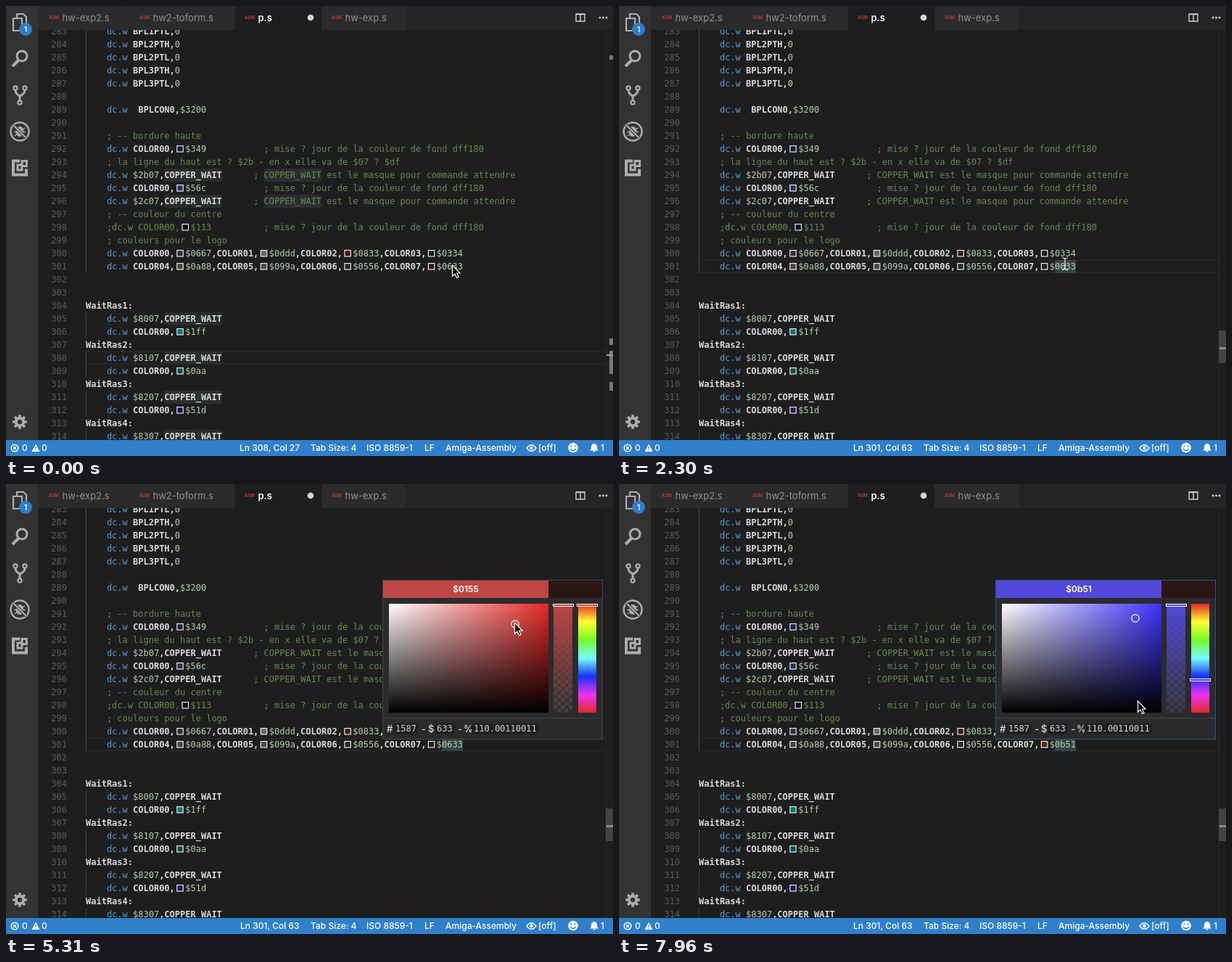
An HTML page with a canvas that plays this animation: 837x620 px, repeating every 8 s.

```html
<!DOCTYPE html>
<html lang="en">
<head>
<meta charset="utf-8">
<title>Assembly colour picker</title>
<style>
html, body { margin: 0; width: 100%; height: 100%; overflow: hidden; background: #1e1e1e; }
canvas { display: block; }
</style>
</head>
<body>
<canvas id="stage" width="837" height="620"></canvas>
<script>
const g = document.getElementById('stage').getContext('2d', { alpha: false });
const LOOP = 8000, CLICK = 660, OPEN = 2360, PRESS = 3490, RELEASE = 5450, HUE_PRESS = 6270, HUE_RELEASE = 7260;
const MONO = '12px "DejaVu Sans Mono", monospace';
const ui = (size, weight = 400) => `${weight} ${size}px Inter, sans-serif`;
const CW = 7.224, LEFT = 110, SWATCH = 14.4, FIRST = 283;
const WHITE = '#d8d8d8', GREEN = '#638b4d', NUMBER = '#b5cea8', KEYWORD = '#569cd6', ICON = '#adadad';

// "~" marks a colour swatch in front of a value
const wait = n => `    dc.w $${n},COPPER_WAIT`;
const fond = '; mise ? jour de la couleur de fond dff180';
const masque = wait('').length && '      ; COPPER_WAIT est le masque pour commande attendre';
const source = value => [
  ...['1PTL', '2PTH', '2PTL', '3PTH', '3PTL'].map(s => `    dc.w BPL${s},0`),
  '',
  '    dc.w  BPLCON0,$3200',
  '',
  '    ; -- bordure haute',
  '    dc.w COLOR00,~$349           ' + fond,
  '    ; la ligne du haut est ? $2b - en x elle va de $07 ? $df',
  wait('2b07') + masque,
  '    dc.w COLOR00,~$56c           ' + fond,
  wait('2c07') + masque,
  '    ; -- couleur du centre',
  '    ;dc.w COLOR00,~$113          ' + fond,
  '    ; couleurs pour le logo',
  '    dc.w COLOR00,~$0667,COLOR01,~$0ddd,COLOR02,~$0833,COLOR03,~$0334',
  '    dc.w COLOR04,~$0a88,COLOR05,~$099a,COLOR06,~$0556,COLOR07,~' + value,
  '', '',
  'WaitRas1:', wait('8007'), '    dc.w COLOR00,~$1ff',
  'WaitRas2:', wait('8107'), '    dc.w COLOR00,~$0aa',
  'WaitRas3:', wait('8207'), '    dc.w COLOR00,~$51d',
  'WaitRas4:', wait('8307')
];

const pointerPath = [
  [0, 615, 357], [1610, 615, 357], [1900, 617, 360], [2190, 615, 355], [2900, 615, 355],
  [3130, 681, 263], [PRESS, 681, 263], [4250, 696, 198], [4310, 696, 198], [4950, 701, 191],
  [5310, 701, 191], [RELEASE, 711, 183], [6040, 798, 251], [HUE_PRESS, 798, 251],
  [6500, 801, 262], [6740, 801, 264], [6850, 802, 270], [6970, 802, 273],
  [HUE_RELEASE, 802, 273], [7660, 724, 250], [7840, 724, 250], [7960, 715, 299], [LOOP, 715, 299]
];
const titles = [[0, '$0633'], [PRESS, '$0133'], [3900, '$0166'], [4600, '$0155'],
  [HUE_PRESS, '$0651'], [6740, '$0851'], [6900, '$0b51']];
const values = [[0, '$0633'], [RELEASE, '$0155'], [HUE_RELEASE, '$0b51']];
const hues = [[229, 42, 38], [255, 254, 50], [117, 250, 40], [117, 251, 253], [21, 50, 253], [234, 51, 247], [229, 42, 38]];

const lerp = (a, b, k) => a + (b - a) * k;
const rgb = (c, a = 1) => `rgba(${c.map(Math.round)},${a})`;
const at = (list, t) => list.filter(e => e[0] <= t).pop()[1];
const rowTop = n => 26 + (n - FIRST) * 18;

function pointer(t) {
  const i = Math.max(1, pointerPath.findIndex(p => p[0] > t));
  const a = pointerPath[i - 1], b = pointerPath[i];
  let k = (t - a[0]) / (b[0] - a[0]);
  k = k * k * (3 - 2 * k);
  return [lerp(a[1], b[1], k), lerp(a[2], b[2], k)];
}

function hueColor(k) {
  const i = Math.min(5, Math.floor(k * 6));
  return hues[i].map((c, n) => lerp(c, hues[i + 1][n], k * 6 - i));
}

function rect(x, y, w, h, color) {
  g.fillStyle = color;
  g.fillRect(x, y, w, h);
}
function frame(x, y, w, h, color) {
  g.lineWidth = 1;
  g.strokeStyle = color;
  g.strokeRect(x + .5, y + .5, w - 1, h - 1);
}
function text(s, x, y, color, font, align = 'left') {
  g.font = font;
  g.fillStyle = color;
  g.textAlign = align;
  g.fillText(s, x, y);
}
function line(d, color, width) {
  g.strokeStyle = color;
  g.lineWidth = width;
  g.stroke(new Path2D(d));
}
function fill(d, color) {
  g.fillStyle = color;
  g.fill(new Path2D(d));
}
function circle(x, y, r, color, width) {
  g.beginPath();
  g.arc(x, y, r, 0, 7);
  g.fillStyle = g.strokeStyle = color;
  g.lineWidth = width;
  width ? g.stroke() : g.fill();
}
function gradient(x, y, w, h, vertical, ...colors) {
  const fade = g.createLinearGradient(x, y, vertical ? x : x + w, vertical ? y + h : y);
  colors.forEach((c, i) => fade.addColorStop(i / (colors.length - 1), c));
  rect(x, y, w, h, fade);
}

function codeLine(s, y) {
  let x = LEFT;
  for (const token of s.match(/;.*|dc\.w|~?\$[\da-f]+|\b0\b|\w+:?|\s+|,/g) || []) {
    const color = token[0] === ';' ? GREEN : token === 'dc.w' ? KEYWORD : /^(~?\$|0$)/.test(token) ? NUMBER : WHITE;
    token.split('~').forEach((part, i) => {
      if (i) {
        const dim = [...part.match(/[\da-f]{3}\b/)[0]].map(d => parseInt(d, 16) * 8);
        rect(x + 2.4, y + 4, 9.6, 9.6, '#e8e8e8');
        rect(x + 3.6, y + 5.2, 7.2, 7.2, rgb(dim));
        x += SWATCH;
      }
      text(part, x, y + 13, color, (color === WHITE ? 'bold ' : '') + MONO);
      x += part.length * CW;
    });
  }
}

function editor(t) {
  const clicked = t >= CLICK, current = clicked ? 301 : 308, y = rowTop(current);
  rect(44, 33, 793, 565, '#1e1e1e');
  g.save();
  g.beginPath();
  g.rect(44, 33, 793, 565);
  g.clip();
  rect(LEFT, y, 717, 1, '#2c2c2c');
  rect(LEFT, y + 17, 717, 1, '#2c2c2c');
  if (t >= 1010) rect(601, 350, 29, 18, '#37434a');
  source(at(values, t)).forEach((s, i) => {
    const n = FIRST + i, top = rowTop(n);
    if (!clicked) for (const m of s.matchAll(/COPPER_WAIT/g)) rect(LEFT + m.index * CW, top, 11 * CW, 18, '#2b2e2f');
    if (n <= 301 || s[0] === ' ') rect(LEFT, top, 1, 18, n <= 301 || n === 308 || n === 309 ? '#4a4a4a' : '#3a3a3a');
    text(n, 84, top + 13, '#5a5a5a', MONO, 'right');
    codeLine(s, top);
  });
  const caret = clicked && t < PRESS && (t < 1190 || (t >= 1690 && t < 2190) || (t >= 2660 && t < 3130));
  if (caret) rect(615, 350, 2, 18, '#aeafad');
  rect(827, 33, 1, 565, '#2b2b2b');
  if (clicked) {
    rect(827, 447, 10, 45, '#434343');
    rect(828, 470, 9, t < 1010 ? 2 : 3, '#8c8c8c');
  } else {
    for (const [top, h] of [[68, 6], [458, 9], [475, 32], [518, 12]]) rect(832, top, 5, h, '#777');
    rect(828, 480, 9, 2, '#a0a0a0');
  }
  g.restore();
}

function tabs() {
  rect(44, 0, 793, 33, '#252526');
  rect(44, 0, 125, 33, '#2b2b2c');
  rect(170, 0, 145, 33, '#2b2b2c');
  rect(316, 0, 119, 33, '#1e1e1e');
  rect(436, 0, 115, 33, '#2b2b2c');
  [[59, 'hw-exp2.s'], [184, 'hw2-toform.s'], [329, 'p.s'], [449, 'hw-exp.s']].forEach(([x, name], i) => {
    text('ASM', x, 18, '#c0413d', ui(6, 600));
    text(name, x + 18.5, 21, i === 2 ? '#fff' : '#919191', ui(13, i === 2 ? 600 : 400));
  });
  circle(420, 16, 4.3, '#d4d4d4');
  line('M786 11.5h12v9.5h-12zM792 11v10M785.5 11h13', '#d0d0d0', 1.4);
  for (const x of [819, 823.5, 828]) circle(x, 16, 1.5, '#d0d0d0');
}

function activityBar() {
  rect(0, 0, 44, 598, '#333');
  line('M15 17v-6h9l4 4v13h-6M10 17h12v17h-12z', ICON, 2.2);
  circle(27, 32, 9, '#2f7dcb');
  text('1', 27, 36, '#fff', ui(10, 600), 'center');
  circle(22, 69, 7, ICON, 3);
  line('M17 75L9 83', ICON, 4);
  for (const [x, y] of [[13, 113], [26, 113], [19, 133]]) circle(x, y, 2.6, ICON, 2.2);
  line('M13 116q0 5 6 8q7-3 7-8M19 123v7', ICON, 3);
  circle(19, 173, 12.5, ICON, 2.5);
  fill('M19 166c7 0 7 14 0 14s-7-14 0-14', ICON);
  line('M12 168l14 11M12 179l14-11M11 173.5h16', ICON, 1.5);
  line('M10 164l18 18', '#333', 4);
  line('M10 164l18 18', ICON, 2.2);
  line('M19 213.5h-9v19h18v-8', ICON, 4);
  line('M22 213.5h6.5v7h-6.5zM16 219h6v7h-6z', ICON, 3);
  circle(19, 573, 5.2, ICON, 4);
  for (let i = 0; i < 8; i++) {
    const c = Math.cos(i * Math.PI / 4), s = Math.sin(i * Math.PI / 4);
    line(`M${19 + 6 * c} ${573 + 6 * s}L${19 + 9.8 * c} ${573 + 9.8 * s}`, ICON, 3.6);
  }
}

function statusBar(t) {
  rect(0, 598, 837, 22, '#307fcb');
  const label = (s, x) => text(s, x, 613, '#fff', ui(12, 500));
  circle(12, 609, 4.8, '#fff', 1.5);
  line('M10 607l4 4M14 607l-4 4', '#fff', 1.5);
  label('0', 22);
  fill('M41 603.5l5.5 10.5h-11z', '#fff');
  line('M41 607v3.5M41 611.5v1.2', '#307fcb', 1.3);
  label('0', 49);
  t < CLICK ? label('Ln 308, Col 27', 322) : label('Ln 301, Col 63', 323);
  label('Tab Size: 4', 420);
  label('ISO 8859-1', 497);
  label('LF', 577);
  label('Amiga-Assembly', 606);
  line('M718 609q6.5-8.5 13 0q-6.5 8.5-13 0z', '#fff', 1.4);
  circle(724.5, 609, 2.4, '#fff');
  label('[off]', 734);
  circle(782, 608.5, 6.8, '#fff');
  for (const x of [779.5, 784.5]) circle(x, 606.5, 1.1, '#307fcb');
  line('M778 610q4 5 8 0', '#307fcb', 1.3);
  fill('M805 612.5q2-1 2-5c0-6 8-6 8 0q0 4 2 5zM809 613h4q-2 3-4 0z', '#fff');
  label('1', 820);
}

function picker(t) {
  const [px, py] = pointer(Math.min(t, RELEASE));
  const [cx, cy] = t < PRESS ? [640, 287] : [px + 1, py + 2];
  const hueY = t < HUE_PRESS ? 167 : pointer(Math.min(t, HUE_RELEASE))[1] - 3;
  const base = hueColor((hueY - 167) / 150 + (t < HUE_PRESS ? 0 : .012));
  const sat = (cx - 528) / 220, val = 1 - (cy - 165) / 150;
  const color = base.map(c => val * lerp(255, c, sat));
  const old = '#2c1615';
  const focused = (t >= RELEASE && t < HUE_PRESS) || t >= HUE_RELEASE;

  rect(519, 132, 304, 220, '#2b2b2e');
  rect(520, 133, 302, 24, old);
  if (t >= PRESS) rect(520, 133, 228, 24, rgb(color));
  text(at(titles, t), 634, 149, '#fff', ui(12, 600), 'center');

  rect(528, 165, 220, 150, rgb(base));
  gradient(528, 165, 220, 150, false, '#fff', 'rgba(255,255,255,0)');
  gradient(528, 165, 220, 150, true, 'rgba(0,0,0,0)', '#000');
  circle(cx, cy, 5.2, '#fff', 1.2);

  rect(755, 165, 26, 150, '#2e2e30');
  for (let y = 0; y < 30; y++) for (let x = y % 2; x < 5; x += 2) rect(755 + x * 5.2, 165 + y * 5, 5.2, 5, '#3e3e40');
  gradient(755, 165, 26, 150, true, rgb(color), rgb(color, 0));
  gradient(789, 165, 25, 150, true, ...hues.map(c => rgb(c)));
  frame(754, 165, 29, 4, '#fff');
  frame(787, Math.round(hueY) - 2, 29, 4, '#fff');

  rect(520, 322, 302, 1, '#434346');
  for (const [s, x] of [['#', 525], ['-', 573], ['$', 582], ['-', 623], ['%', 631]]) text(s, x, 342, '#dcdcdc', ui(13, 500));
  for (const [s, x] of [['1587', 537], ['633', 594], ['110.00110011', 645]]) {
    g.fillStyle = '#202022';
    g.beginPath();
    g.roundRect(x - 3, 330, s.length * CW + 6, 15, 3);
    g.fill();
    text(s, x, 341, '#d0d0d0', MONO);
  }
  frame(519, 132, 304, 220, focused ? '#2c5680' : '#454547');
}

function hand(closed) {
  const reach = closed ? -3 : -6;
  g.lineCap = 'round';
  for (const [color, grow] of [['#000', 1], ['#fff', 0]]) {
    circle(0, 3.5, 4.2 + grow, color);
    for (const x of [-4, -1.4, 1.3, 4]) line(`M${x} 3V${reach + Math.abs(x) / 3}`, color, 2 + grow * 2);
    line('M-6 0L-2 5', color, 2 + grow * 2);
  }
  if (!closed) line('M-2.7 1v-4M0 1v-5M2.7 1v-4', '#000', .7);
  g.lineCap = 'butt';
}

function cursor(t) {
  const [x, y] = pointer(t);
  g.save();
  g.translate(x, y);
  if (t > 1700 && t < 2980) line('M-4-8q4 0 4 2.5V6q0 2.5-4 2.5M4-8q-4 0-4 2.5V6q0 2.5 4 2.5M-2 2h4', '#e6e6e6', 1.2);
  else if (x > 785) hand(t >= HUE_PRESS && t < HUE_RELEASE);
  else {
    const arrow = 'M.5 0V15.3L4 12l2.5 5.5 2.5-1.1L6.600 11H11z';
    fill(arrow, '#000');
    line(arrow, '#fff', 1.2);
  }
  g.restore();
}

function draw(now) {
  const t = now % LOOP;
  editor(t);
  tabs();
  activityBar();
  statusBar(t);
  if (t >= OPEN) picker(t);
  cursor(t);
  requestAnimationFrame(draw);
}
requestAnimationFrame(draw);
</script>
</body>
</html>
```
